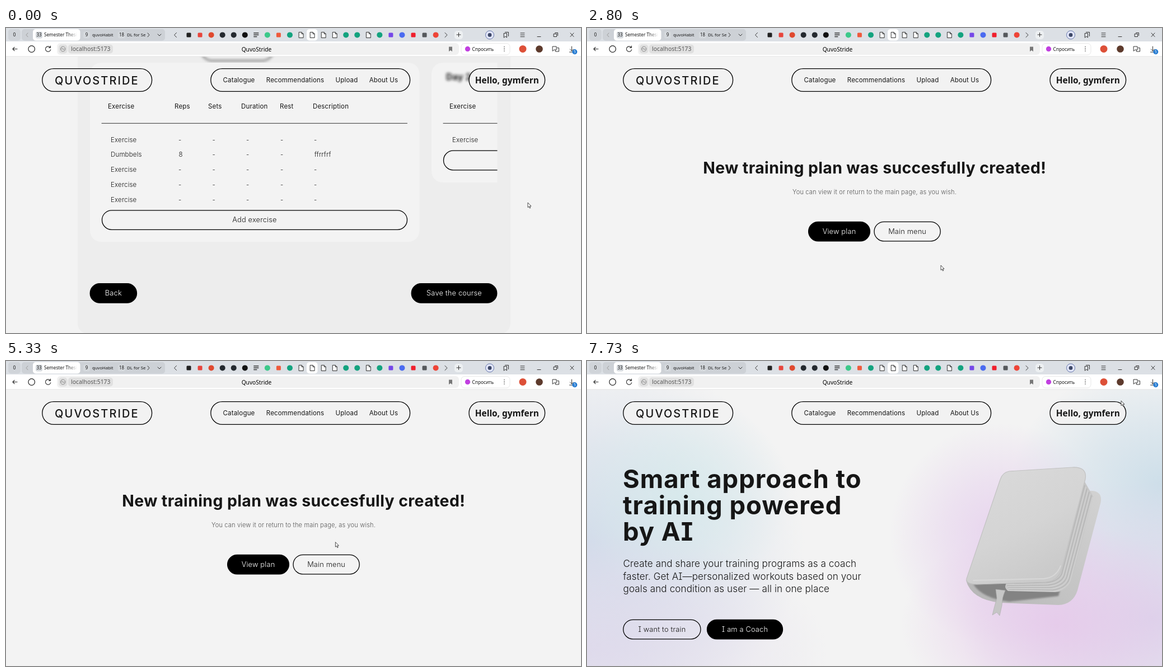
An HTML page that plays this animation: 1027x545 px, repeating every 7800 ms.

```html
<!DOCTYPE html>
<html lang="en">
<head>
<meta charset="utf-8">
<title>QuvoStride</title>
<style>
html, body { margin: 0; width: 100%; height: 100%; overflow: hidden; background: #f3f3f3; }
svg { display: block; }
text { font-family: Inter, sans-serif; fill: #161616; font-size: 11.5px; letter-spacing: .18px; white-space: pre; }
.ui { font-family: "Noto Sans", "Open Sans", sans-serif; letter-spacing: 0; }
.mid { text-anchor: middle; }
.light { font-weight: 300; }
.btn { font-size: 12.8px; font-weight: 300; text-anchor: middle; font-feature-settings: "cv08"; }
.inv { fill: #fff; }
.line { fill: none; stroke: #333; stroke-width: 1; stroke-linecap: round; stroke-linejoin: round; }
.title { font-size: 28.4px; font-weight: 700; letter-spacing: .4px; }
.hero { font-size: 45.4px; font-weight: 700; letter-spacing: 1px; font-feature-settings: "cv08"; }
.lead { font-size: 17.1px; font-weight: 300; letter-spacing: .1px; font-feature-settings: "cv08"; }
</style>
</head>
<body>
<svg id="stage" width="1027" height="545" viewBox="0 0 1027 545">
  <defs>
    <filter id="blur" x="-30%" y="-60%" width="160%" height="220%"><feGaussianBlur stdDeviation="2.6"/></filter>
    <filter id="soft"><feGaussianBlur stdDeviation="1.5"/></filter>
    <clipPath id="side"><rect x="740" y="51" width="137.5" height="494"/></clipPath>
    <clipPath id="below"><rect y="51" width="1027" height="494"/></clipPath>
    <linearGradient id="fade"><stop stop-color="#fff" stop-opacity="0"/><stop offset="1" stop-color="#fff"/></linearGradient>
    <linearGradient id="cover" x1="0" y1="0" x2=".5" y2="1"><stop stop-color="#dadada"/><stop offset=".6" stop-color="#d4d4d4"/><stop offset="1" stop-color="#cacaca"/></linearGradient>
    <linearGradient id="back" x1="0" y1="1" x2="1" y2="0"><stop stop-color="#b4b4b4"/><stop offset=".4" stop-color="#c3c3c3"/><stop offset="1" stop-color="#d2d2d2"/></linearGradient>
  </defs>
  <g id="course"></g>
  <g id="done"></g>
  <g id="home"></g>
  <g id="nav"></g>
  <g id="chrome"></g>
  <g id="arrow"><path d="M0 0V8.600L2 6.900L3.400 10L4.800 9.400L3.400 6.300H6Z" fill="#fff" stroke="#222" stroke-width=".8" stroke-linejoin="round"/></g>
  <g id="hand"><path d="M-1 .800Q0-.600 1 .800V4.800L4.500 5.600Q5.800 6 5.600 7.500L4.900 10.500V13H-1V11L-4 7.600Q-4 6 -2.600 6.500L-1 7.800Z" fill="#fff" stroke="#222" stroke-width=".9" stroke-linejoin="round"/></g>
</svg>
<script>
const $ = id => document.getElementById(id);
const text = (x, y, s, cls = '', more = '') => `<text x="${x}" y="${y}" class="${cls}" ${more}>${s}</text>`;
const rect = (x, y, w, h, r, fill, more = '') =>
  `<rect x="${x}" y="${y}" width="${w}" height="${h}" rx="${r}" fill="${fill}" ${more}/>`;
const dot = (x, y, r, fill, more = '') => `<circle cx="${x}" cy="${y}" r="${r}" fill="${fill}" ${more}/>`;
const line = (d, more = '') => `<path class="line" d="${d}" ${more}/>`;
const shape = (d, fill, more = '') => `<path d="${d}" fill="${fill}" ${more}/>`;
const pill = (x, y, w, h, fill = 'none') => rect(x, y, w, h, h / 2, fill, 'stroke="#000" stroke-width="1.3"');
const button = (x, y, w, label, dark) =>
  pill(x, y, w, 34.6, dark ? '#000' : 'none') + text(x + w / 2, y + 21.6, label, dark ? 'btn inv' : 'btn');

function course() {
  const cols = [310, 370.5, 431, 492, 552];
  const heads = [[182, 'Exercise'], [301, 'Reps'], [361, 'Sets'], [420, 'Duration'], [489, 'Rest'], [548, 'Description']];
  let s = rect(128, 30, 773, 516, 18, '#ededed');
  s += `<g clip-path="url(#below)">${rect(349, 20, 128, 38, 19, '#f0f0f0', 'stroke="#8a8a8a" stroke-width="4" filter="url(#blur)"')}</g>`;
  s += rect(150, 62, 588.5, 320, 20, '#f3f3f3');
  s += heads.map(([x, h]) => text(x, 144, h)).join('');
  s += line('M171 170.300H716.500');
  for (let i = 0; i < 5; i++) {
    const y = 203.6 + i * 26.75;
    s += text(187, y, i == 1 ? 'Dumbbels' : 'Exercise', 'light');
    cols.forEach((x, c) => {
      const v = i == 1 && c == 0 ? '8' : i == 1 && c == 4 ? 'ffrrfrf' : '-';
      s += text(v == '8' ? 308.5 : v == '-' ? x - 2 : 551, y, v, 'light');
    });
  }
  s += button(171.5, 325.8, 545, 'Add exercise');
  s += `<g clip-path="url(#side)">${rect(760, 62, 300, 214, 20, '#f3f3f3')}
    ${text(786, 92.5, 'Day 2', '', 'style="font-size:16px;font-weight:700" filter="url(#blur)"')}
    ${text(792, 144, 'Exercise')}${line('M781 170.300H900')}
    ${text(797, 203.6, 'Exercise', 'light')}${pill(781.5, 219.2, 400, 34.6)}</g>`;
  return s + button(150.2, 456.6, 83.3, 'Back', true) + button(724.2, 456.6, 152.6, 'Save the course', true);
}

function done() {
  return text(513.7, 259.5, 'New training plan was succesfully created!', 'mid title') +
    text(513.5, 296.7, 'You can view it or return to the main page, as you wish.', 'mid light', 'style="font-size:11px;fill:#555"') +
    button(395.6, 346.3, 109.8, 'View plan', true) + button(513, 346.3, 118.2, 'Main menu');
}

// x, y, rx, ry, colour, opacity
const glows = [
  [0, 320, 390, 330, '#cfd9e9', .9], [165, 240, 200, 180, '#d3ebeb', .65], [0, 520, 430, 220, '#dcd4ea', .7],
  [1027, 220, 270, 220, '#c9dce8', .9], [1010, 460, 350, 250, '#d8d2ea', .9],
  [740, 310, 200, 200, '#e3c9ec', .75], [840, 470, 280, 180, '#e6c8ea', .85]
];

function book() {
  let s = shape('M884 232H903Q921 234 917.500 253L876 410Q868 435 842 436L738 432Q686 426 677 392L700 388L850 380Z', 'url(#back)');
  // shadow inside the spine, then the block of pages
  s += shape('M690 399L752 396L850 392L842 420L754 430Q706 424 690 399Z', '#838383', 'filter="url(#soft)"');
  s += shape('M888 214L904 242L866 392Q858 412 836 413L752 411Q743 404 750 396L840 388Z', '#c6c6c6');
  for (let i = 0; i < 8; i++)
    s += `<path d="M${889 + i * 2} ${222 + i * 3}L${848 + i * 2.2} ${380 + i * 1.6}Q${842 + i * 2.2} ${394 + i * 2} ${820 + i * 2} ${396 + i * 2.2}L${748 + i} ${398 + i * 1.7}" fill="none" stroke="${i % 2 ? '#d2d2d2' : '#b2b2b2'}" stroke-width="1.1"/>`;
  s += shape('M730 408L747 410Q741 423 741 437L737 455L732 449L724 454Q728 437 732 424Z', '#c6c6c6', 'stroke="#aaa" stroke-width=".6"');
  s += shape('M754 197L867 190Q894 189 890 211L848 371Q841 394 818 395L696 399Q673 398 679 386L738 212Q742 199 754 197Z', 'url(#cover)', 'stroke="#c2c2c2" stroke-width="1.2"');
  return s + line('M846 366Q838 387 816 389L690 392', 'style="stroke:#d8d8d8;stroke-width:2"');
}

function home() {
  let s = rect(0, 51, 1027, 494, 0, '#f3f3f3');
  glows.forEach(([x, y, rx, ry, c, a], i) => {
    s += `<radialGradient id="glow${i}"><stop stop-color="${c}" stop-opacity="${a}"/><stop offset=".5" stop-color="${c}" stop-opacity="${a * .55}"/><stop offset="1" stop-color="${c}" stop-opacity="0"/></radialGradient>
      <ellipse cx="${x}" cy="${y}" rx="${rx}" ry="${ry}" fill="url(#glow${i})"/>`;
  });
  ['Smart approach to', 'training powered', 'by AI'].forEach((t, i) => s += text(64, 227 + i * 46.8, t, 'hero'));
  ['Create and share your training programs as a coach', 'faster. Get AI—personalized workouts based on your',
    'goals and condition as user — all in one place'].forEach((t, i) => s += text(64.5, 368 + i * 22.6, t, 'lead'));
  return s + button(64.8, 462.3, 138.2, 'I want to train') + button(214.5, 462.3, 135, 'I am a Coach', true) + book();
}

function nav() {
  const fill = 'rgba(243,243,243,.88)';
  return pill(64.8, 72.6, 195.8, 40.8, fill) + pill(365.8, 72.6, 355.8, 40.8, fill) + pill(827, 72.6, 135.6, 40.8, fill) +
    text(87, 100.6, 'QUVOSTRIDE', '', 'style="font-size:20px;font-weight:500;letter-spacing:2.1px"') +
    [[416, 'Catalogue'], [516.5, 'Recommendations'], [608.5, 'Upload'], [674.5, 'About Us']]
      .map(([x, t]) => text(x, 96.6, t, 'mid')).join('') +
    text(894.8, 98.8, 'Hello, gymfern', 'ui mid', 'style="font-size:15.4px;font-weight:700"');
}

// One entry per tab, 20px apart: colour of a plain mark, "doc" or "list"
const tabs = ['s#222', 's#e8453c', 'c#e0492f', 'c#24292f', 'c#24292f', 'c#111', 'list', 'c#3cc98a', 's#ef5a3c', 'c#14a37f',
  'doc', 'doc', 'doc', 'doc', 'c#14a37f', 'c#14a37f', 'doc', 'c#14a37f', 's#7547e8', 'c#4b6bf0', 's#f01f2d', 's#55585c', 'c#ee4437'];

function tabIcon(kind, i) {
  const x = 326.5 + i * 20.05, c = kind.slice(1);
  if (kind == 'doc') return `<path class="line" d="M${x - 3.5} 7.500h4.500l3 3v7h-7.500zm4.500 0v3h3" style="fill:#fff"/>`;
  if (kind == 'list') return line(`M${x - 4} 9h8m-8 3.300h8m-8 3.300h5`, 'style="stroke-width:1.5"');
  return kind[0] == 's' ? rect(x - 4, 8.4, 8, 8, 1.5, c) : dot(x, 12.4, 5, c);
}

function chrome() {
  const small = (x, y, t, size = 8, more = '') => text(x, y, t, 'ui', `style="font-size:${size}px;${more}"`);
  const badge = (x, w, n) => rect(x, 6.5, w, 12, 3, '#d5d9dd') + text(x + w / 2, 15.3, n, 'ui mid', 'style="font-size:8px"');
  let s = rect(0, 0, 1027, 24.5, 0, '#dce0e5') + rect(0, 24, 1027, 27, 0, '#fff') + line('M0 50.800H1027', 'style="stroke:#e4e4e4"');
  s += rect(4, 2, 22, 20.5, 5, '#d0d4d9') + text(15, 15.3, '0', 'ui mid', 'style="font-size:8px"');
  s += rect(28, 2, 256, 20.5, 5, '#cdd1d6') + line('M39 9l-3 3.400l3 3.400', 'style="stroke:#999"');
  s += rect(48, 2, 84.5, 20.5, 5, '#fff') + badge(53, 12, '33') + small(68, 15.4, 'Semester Thesi', 8.2);
  s += rect(110, 5, 17, 15, 0, 'url(#fade)') + rect(126.5, 5, 5, 15, 0, '#fff');
  s += badge(138, 12, '9') + small(154, 15.4, 'quvoHabit', 7.7) + badge(200, 13, '18') + small(216, 15.4, 'DL for Se', 7.9);
  s += line('M253 9l3 3.400l-3 3.400M271 11l3 3l3-3M304.500 8.500l-4 4l4 4M784 8.500l4 4l-4 4');
  s += rect(537, 2, 19.5, 20.5, 5, '#fff') + tabs.map(tabIcon).join('');
  s += rect(801, 5, 15, 15, 5, '#edf0f2') + line('M808.500 8.500v7m-3.500-3.500h7');
  s += dot(864, 12.4, 7.5, '#e3e7fb', 'stroke="#6576a8" stroke-width="1"') + dot(864, 12.4, 3.4, '#3d4766');
  s += line('M889.500 9.500h5v7.500l-2.500-2l-2.500 2zm2-2h6v7M919 9h7m-7 3.300h7m-7 3.300h7M949 15.500h6M978.500 10.500h5v5h-5zm2-2h5v5M1008 9l6 6.500m0-6.500l-6 6.500');
  s += line('M20 37.500H12m3-3l-3 3l3 3M78.800 34.500A4.700 4.700 0 1 0 79.800 38.500M79.500 32.200v3h-3', 'style="stroke-width:1.2"');
  s += dot(45.7, 37.5, 5.8, 'none', 'stroke="#222" stroke-width="1.2"');
  s += rect(91, 27, 718, 21, 6, '#f1f1f1') + rect(94, 29.5, 15.5, 16, 5, '#e0e0e0') + rect(111, 29.5, 80, 16, 5, '#e0e0e0');
  s += dot(101.7, 37.5, 4.3, 'none', 'stroke="#888"') + line('M98.700 34.500l6 6M98 37.500h7', 'style="stroke:#888;stroke-width:.7"');
  s += small(116, 41.3, 'localhost:5173', 10.4, 'fill:#555') + text(447.5, 41.5, 'QuvoStride', 'ui mid', 'style="font-size:10.2px;fill:#000"');
  s += shape('M791 33.500h6v8.500l-3-2.300l-3 2.300z', '#777');
  s += rect(813, 27.5, 87, 20.5, 6, '#fff', 'stroke="#e8e8e8"') + dot(824.5, 37.4, 4.6, '#c13fe0') + small(832.5, 40.5, 'Спросить', 8.3);
  s += [33.8, 37.4, 41].map(y => dot(890, y, .8, '#333')).join('');
  s += dot(923, 37.4, 6.5, '#dd5038') + dot(952.5, 37.5, 6.3, '#5d3a2c');
  s += line('M976.500 33h6.500v6h-4l-2.500 2zm8 2.500h3v6.500h-6v-2M1010.500 33v8m-3-3l3 3l3-3M1006.500 43h5');
  return s + dot(1015.8, 42.6, 4.5, '#1f78d1') + text(1015.8, 45, '5', 'ui mid', 'style="font-size:6.5px;fill:#fff"');
}

Object.entries({ course, done, home, nav, chrome }).forEach(([id, draw]) => $(id).innerHTML = draw());

// Pointer path: ms, x, y
const path = [
  [0, 932, 312], [200, 930, 316], [800, 795, 446], [1130, 773, 472], [1333, 772, 474], [2200, 772, 474], [2467, 768, 466],
  [2800, 632, 424], [3267, 594, 391], [3867, 425, 245], [4200, 380, 205], [4400, 341, 250], [4667, 450, 372],
  [4867, 530, 350], [5267, 580, 318], [5600, 622, 346], [5933, 612, 364], [6467, 608, 366], [6533, 608, 366],
  [6600, 610, 359], [6867, 612, 357], [7533, 930, 92], [7733, 954, 71], [7800, 954, 71]
];
const links = {
  course: [[150, 456, 84, 36], [724, 456, 153, 36], [171, 325, 546, 36]],
  done: [[395, 346, 111, 36], [513, 346, 119, 36]],
  home: [[64, 462, 139, 36], [214, 462, 136, 36]]
};

function pointer(t) {
  const i = Math.max(1, path.findIndex(k => k[0] > t));
  const [t0, x0, y0] = path[i - 1], [t1, x1, y1] = path[i];
  const k = (t - t0) / (t1 - t0);
  return [x0 + (x1 - x0) * k, y0 + (y1 - y0) * k];
}

function show(now) {
  const step = Math.floor(((now % 7800) + 7) * .015) % 117;
  const t = step * 200 / 3;
  const page = step < 30 ? 'course' : step < 99 ? 'done' : 'home';
  const [x, y] = pointer(t);
  const over = links[page].some(([a, b, w, h]) => x >= a && x <= a + w && y >= b && y <= b + h);
  for (const id in links) $(id).style.display = id == page ? '' : 'none';
  $('arrow').style.display = over ? 'none' : '';
  $('hand').style.display = over ? '' : 'none';
  $(over ? 'hand' : 'arrow').setAttribute('transform', `translate(${x.toFixed(1)} ${y.toFixed(1)})`);
}

function tick() {
  show(performance.now());
  requestAnimationFrame(tick);
}
tick();
</script>
</body>
</html>
```
